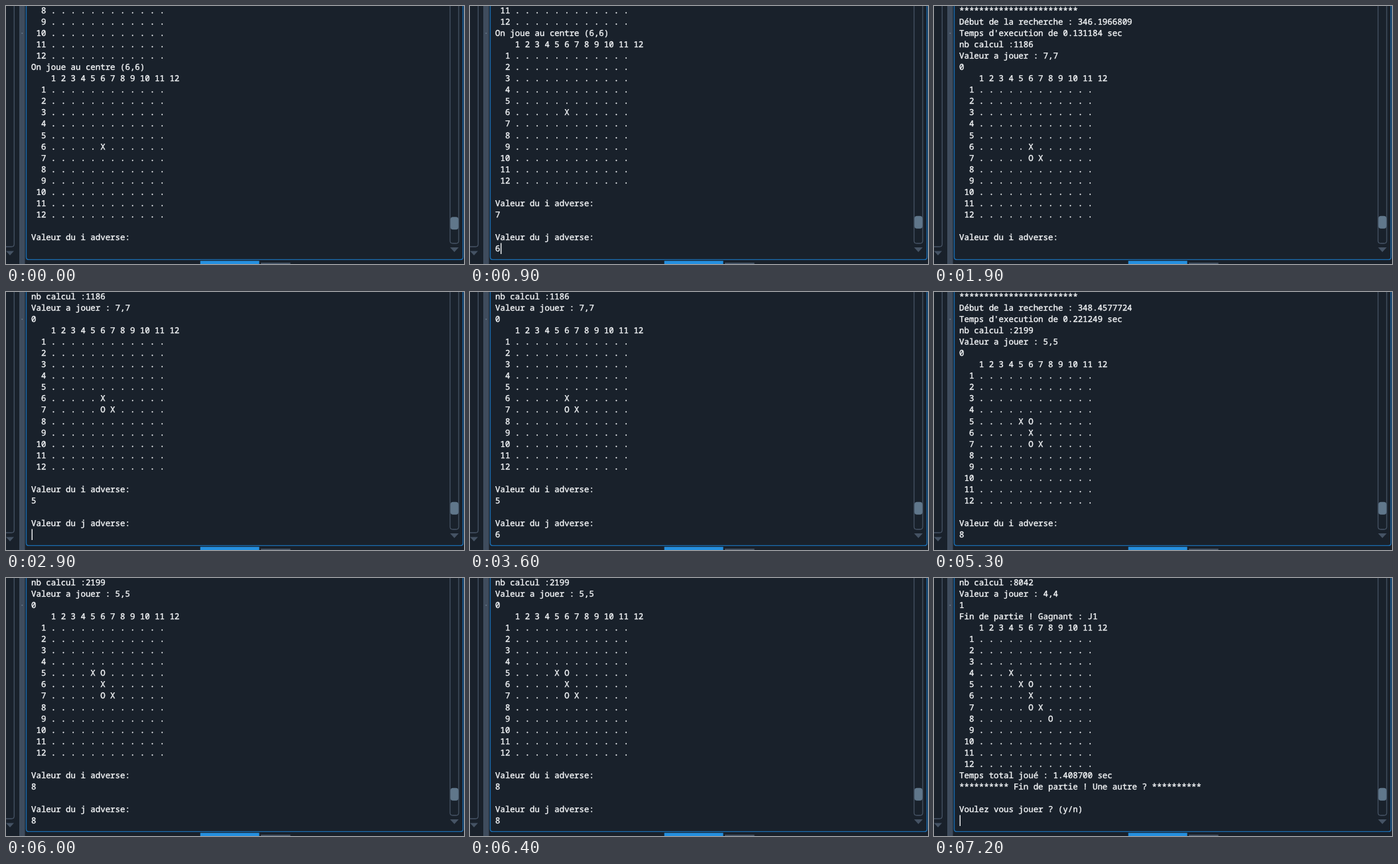
An HTML page for the animation above (7.3 s loop, 690 by 388 pixels).

```html
<!DOCTYPE html>
<html lang="fr">
<head>
<meta charset="utf-8">
<title>Console de jeu</title>
<style>
  html, body { margin: 0; width: 100%; height: 100%; overflow: hidden; background: #19212b; }
  svg, pre { position: absolute; left: 0; top: 0; }
  pre {
    left: 38px; top: -2px; margin: 0; color: #f4f6f8;
    font: 12.42px/17.05px "Noto Sans Mono", "DejaVu Sans Mono", monospace;
    -webkit-text-stroke: 0.4px #f4f6f8;
    text-rendering: geometricPrecision; font-variant-ligatures: none;
  }
</style>
</head>
<body>
<svg width="690" height="388" viewBox="0 0 690 388">
  <g fill="none" stroke="#455364" stroke-width="1.3">
    <path d="M12.3 -5V358q0 4 -4 4H-5"/>
    <path d="M669 -5V353q0 4 4 4h5q4 0 4 -4V-5"/>
  </g>
  <path d="M20 0h8.500v388h-8.500z" fill="#3f4c5d"/>
  <circle cx="24.300" cy="41" r="1" fill="#66788a"/>
  <path d="M0 368.500h12l-6 6.500zM669 363h13l-6.500 7z" fill="#455364"/>
  <path d="M30.500 -5V377.400q0 4 4 4H684.500q4 0 4 -4V-5" fill="none" stroke="#1a6cb0" stroke-width="1.400"/>
  <path d="M292.700 383.200h88.800v5h-88.800z" fill="#2590e0"/>
  <path d="M384 386h44.500v2H384z" fill="#455364"/>
  <rect id="thumb" x="669.500" width="12.200" height="19" rx="4" fill="#60778b"/>
  <rect id="caret" y="356.500" width="1.400" height="16.500" fill="#f4f6f8"/>
</svg>
<pre id="screen"></pre>
<script>
const LOOP = 7300, ROWS = 22, CHAR = 7.452, BLINK = 500;
const [screenEl, caret, thumb] = ["screen", "caret", "thumb"].map(id => document.getElementById(id));
const range = Array.from({ length: 12 }, (_, i) => i + 1);
const stones = {};

// Adds the stones (row and column as two digits) and prints the whole board.
function board(moves = {}) {
  Object.assign(stones, moves);
  const rows = range.map(i =>
    String(i).padStart(3) + " " + range.map(j => stones[`${i}${j}`] || ".").join(" "));
  return ["    " + range.join(" "), ...rows].join("\n") + "\n";
}

const ask = axis => `\nValeur du ${axis} adverse:\n`;
const report = (start, duration, count, move, flag) =>
  `\n${"*".repeat(24)}\nDébut de la recherche : ${start}\n` +
  `Temps d'execution de ${duration} sec\nnb calcul :${count}\nValeur a jouer : ${move}\n${flag}\n`;
const stars = "*".repeat(10);

// [time, text added to the console, caret visible]
const events = [
  [0, board() + "On joue au centre (6,6)\n" + board({ 66: "X" }) + ask("i"), false],
  [400, "7", true],
  [700, "\n" + ask("j"), true],
  [800, "6", true],
  [1200, "", false],
  [1400, report("346.1966809", "0.131184", 1186, "7,7", 0) + board({ 76: "O", 77: "X" }) + ask("i"), true],
  [2600, "5", true],
  [2900, "\n" + ask("j"), true],
  [3200, "6", true],
  [3500, "", false],
  [3800, report("348.4577724", "0.221249", 2199, "5,5", 0) + board({ 56: "O", 55: "X" }) + ask("i"), true],
  [4800, "8", true],
  [5500, "\n" + ask("j"), true],
  [5700, "8", true],
  [6000, "", false],
  [7200, report("351.0143862", "1.056267", 8042, "4,4", 1) + "Fin de partie ! Gagnant : J1\n" +
    board({ 88: "O", 44: "X" }) + "Temps total joué : 1.408700 sec\n" +
    `${stars} Fin de partie ! Une autre ? ${stars}\n\nVoulez vous jouer ? (y/n)\n`, true],
];

function draw(now) {
  const t = now % LOOP;
  const past = events.filter(([time]) => time <= t);
  const lines = past.map(([, text]) => text).join("").split("\n").slice(-ROWS);
  const [since, , active] = past[past.length - 1];
  const text = lines.join("\n");
  if (screenEl.textContent !== text) screenEl.textContent = text;
  const lit = active && Math.floor((t - since) / BLINK) % 2 === 0;
  caret.setAttribute("visibility", lit ? "visible" : "hidden");
  caret.setAttribute("x", 38.6 + CHAR * lines[ROWS - 1].length);
  thumb.setAttribute("y", t < 700 ? 317.2 : 315.7);
  requestAnimationFrame(draw);
}
draw(0);
</script>
</body>
</html>
```
